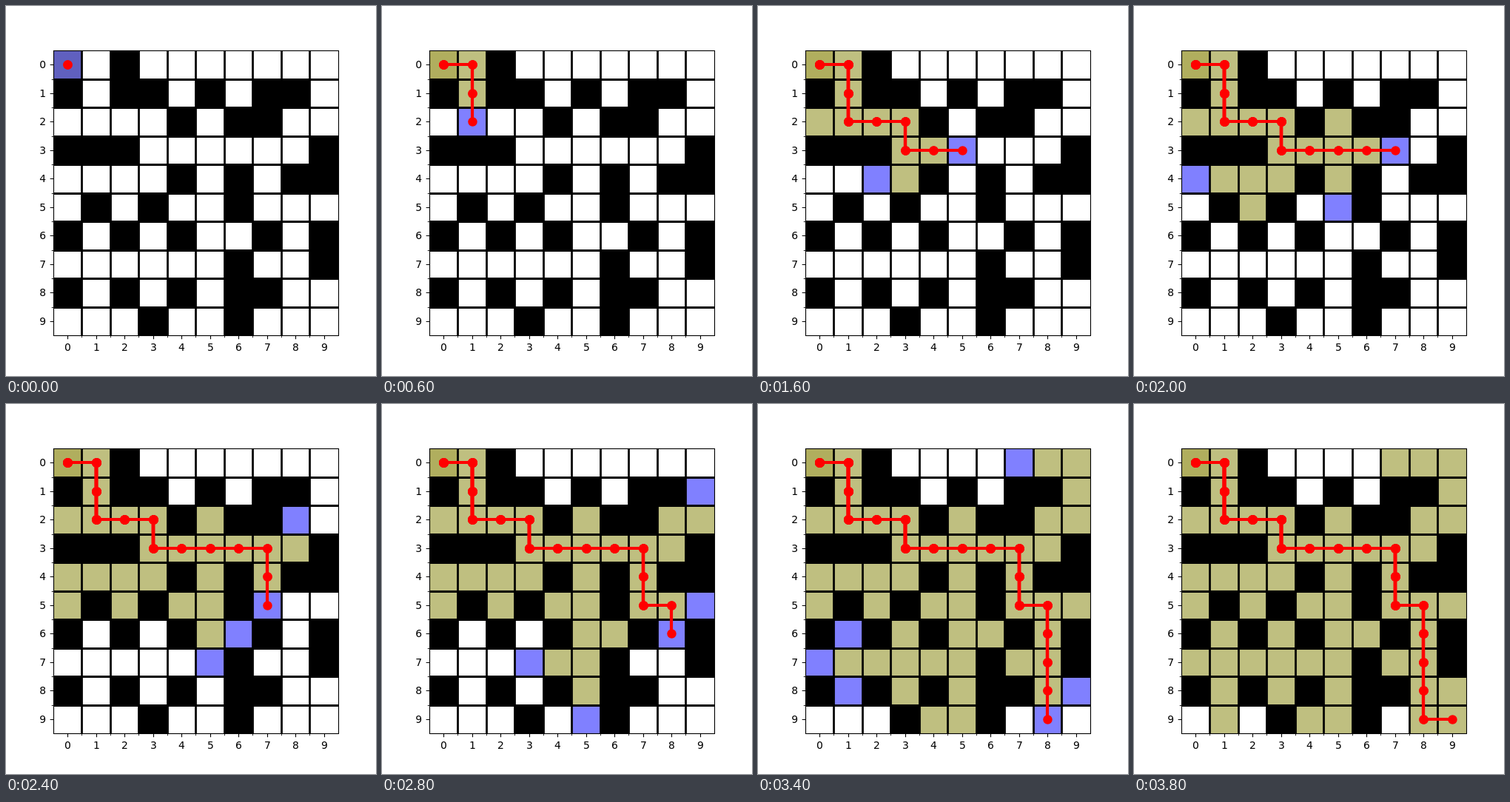
An HTML page for the animation above (4000 ms loop, 500 by 500 pixels).

```html
<!DOCTYPE html>
<html lang="en">
<head>
<meta charset="utf-8">
<title>Breadth-first search in a grid</title>
<style>
  html, body { margin: 0; width: 100%; height: 100%; overflow: hidden; background: #fff; }
  svg { display: block; width: 500px; height: 500px; }
  text { font: 13.89px "DejaVu Sans", sans-serif; }
  #cells { shape-rendering: crispEdges; }
  #grid, #axes { fill: none; stroke: #000; }
  #route { fill: none; stroke: red; stroke-width: 4.17; stroke-linejoin: round; }
</style>
</head>
<body>
<svg id="stage" viewBox="0 0 500 500">
  <defs>
    <marker id="dot" markerUnits="userSpaceOnUse" markerWidth="16" markerHeight="16"
            refX="8" refY="8" orient="0" overflow="visible">
      <circle cx="8.5" cy="8.5" r="6.25" fill="red"/>
    </marker>
  </defs>
  <g id="cells"></g>
  <g id="grid"></g>
  <g id="route"></g>
  <g id="axes"></g>
  <g id="labels"></g>
</svg>
<script>
const MAZE = [
  "0010000000", "1011010110", "0000101100", "1110000001", "0000101011",
  "0101001000", "1010100101", "0000001001", "1010101100", "0001001000"
];
const N = 10, CELL = 38.5, LEFT = 63.75, TOP = 60;
const STEP_MS = 200, STEPS = 20;
const GOAL = N * N - 1;

const edgeX = c => Math.round(LEFT + c * CELL);
const edgeY = r => Math.round(TOP + r * CELL);
const midX = c => edgeX(c + 0.5);
const midY = r => edgeY(r + 0.5);
const isWall = (r, c) => MAZE[r][c] === "1";

function add(parent, tag, attrs) {
  const el = document.createElementNS("http://www.w3.org/2000/svg", tag);
  for (const key in attrs) el.setAttribute(key, attrs[key]);
  document.getElementById(parent).appendChild(el);
  return el;
}

// Breadth-first search that stops as soon as the goal is found.
function search() {
  const dist = { 0: 0 }, from = {}, queue = [0];
  while (!(GOAL in dist)) {
    const cur = queue.shift(), r = Math.floor(cur / N), c = cur % N;
    for (const [dr, dc] of [[1, 0], [0, 1], [-1, 0], [0, -1]]) {
      const y = r + dr, x = c + dc, next = y * N + x;
      if (y < 0 || x < 0 || y >= N || x >= N || isWall(y, x) || next in dist) continue;
      dist[next] = dist[cur] + 1;
      from[next] = cur;
      queue.push(next);
      if (next === GOAL) break;
    }
  }
  const path = [GOAL];
  while (path[0] !== 0) path.unshift(from[path[0]]);
  return { dist, path };
}

const { dist, path } = search();

const cells = [];
for (let r = 0; r < N; r++) {
  for (let c = 0; c < N; c++) {
    cells.push(add("cells", "rect", {
      x: edgeX(c), y: edgeY(r),
      width: edgeX(c + 1) - edgeX(c), height: edgeY(r + 1) - edgeY(r),
      fill: isWall(r, c) ? "#000" : "#fff"
    }));
  }
}

for (let i = 1; i < N; i++) {
  const x = edgeX(i) + 0.5, y = edgeY(i) + 0.5;
  add("grid", "path", { d: `M${x} 60V445M64 ${y}H449`, "stroke-width": 2.78 });
  add("axes", "path", { d: `M${x} 445.5v2.78M64.5 ${y}h-2.78`, "stroke-width": 0.83 });
}

for (let i = 0; i < N; i++) {
  const x = midX(i), y = midY(i);
  add("axes", "path", { d: `M${x + 0.5} 445.5v4.86M64.5 ${y + 0.5}h-4.86`, "stroke-width": 1.11 });
  add("labels", "text", { x: x + 0.5, y: 466, "text-anchor": "middle" }).textContent = i;
  add("labels", "text", { x: 54, y: y + 5, "text-anchor": "end" }).textContent = i;
}
add("axes", "rect", { x: 64.5, y: 60.5, width: 385, height: 385, "stroke-width": 1.11 });

// Each step paints the route so far once more, so its soft edges build up.
const points = path.map(p => `${midX(p % N)},${midY(Math.floor(p / N))}`);
const routes = points.map((_, k) => add("route", "path", {
  d: "M" + points.slice(0, k + 1).join("L") + (k ? "" : "h0"),
  "marker-start": "url(#dot)", "marker-mid": "url(#dot)", "marker-end": "url(#dot)"
}));

function colour(id, step) {
  const d = dist[id];
  if (d === undefined || d > step) return "#fff";
  if (d === step) return id ? "#8080ff" : "#6060bf";
  return id ? "#bfbf80" : "#b0ae5e";
}

let shown = -1;
function show(step) {
  if (step === shown) return;
  shown = step;
  cells.forEach((el, id) => {
    if (!isWall(Math.floor(id / N), id % N)) el.setAttribute("fill", colour(id, step));
  });
  routes.forEach((el, k) => el.setAttribute("visibility", k <= step ? "visible" : "hidden"));
}

const start = performance.now();
function tick() {
  const t = Math.max(0, performance.now() - start);
  show(Math.floor(t / STEP_MS) % STEPS);
  requestAnimationFrame(tick);
}
show(0);
requestAnimationFrame(tick);
</script>
</body>
</html>
```
